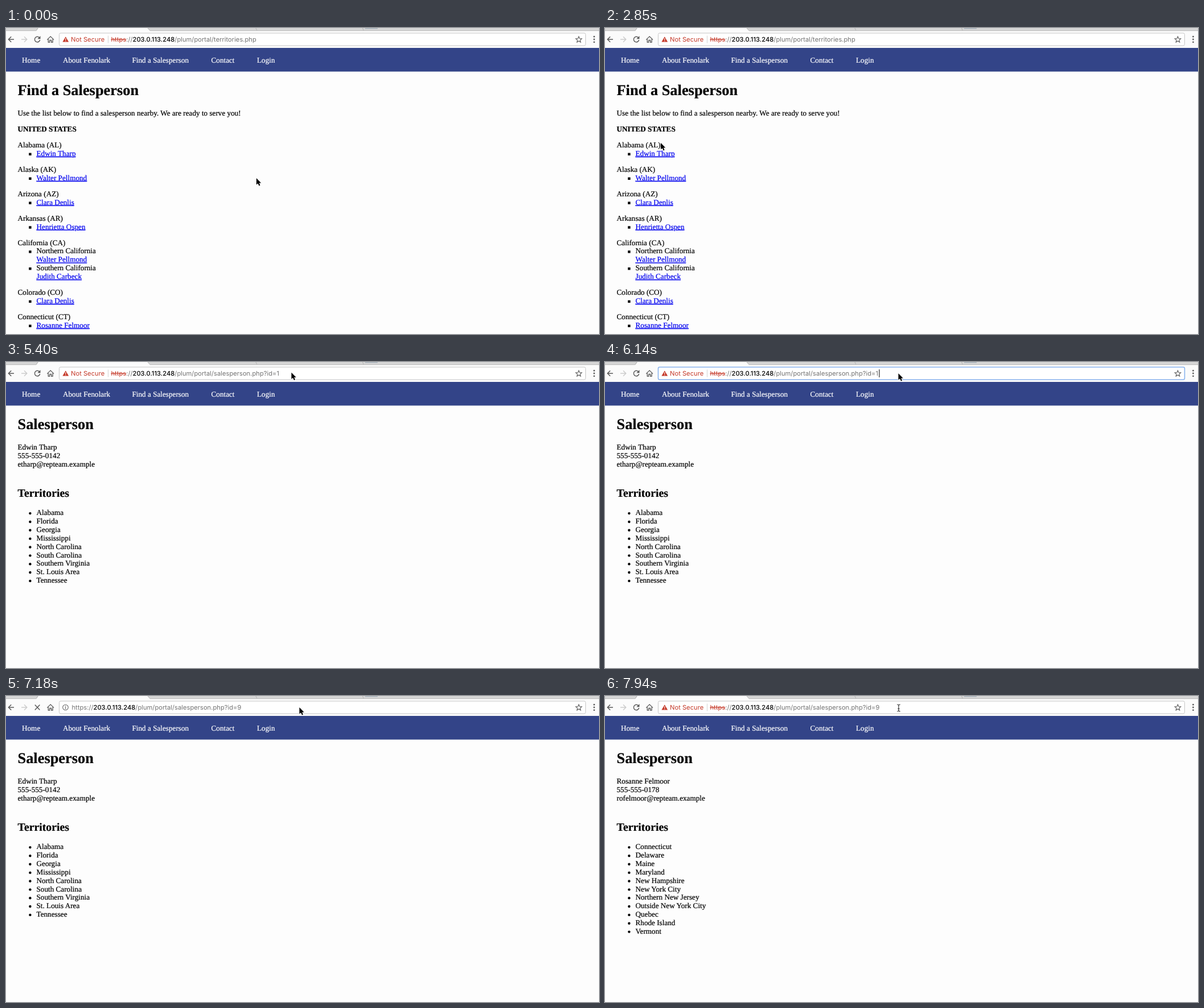
These frames come from a looping animation (1042x538 px, 8 s). An HTML page:

```html
<!DOCTYPE html>
<html lang="en">
<head>
<meta charset="utf-8">
<title>Find a Salesperson</title>
<style>
  html, body { margin: 0; width: 100%; height: 100%; overflow: hidden; background: #fdfdfd; }
  svg { display: block; width: 100%; height: 100%; }
  text {
    font: 13.2px "Liberation Serif", serif; text-rendering: geometricPrecision; white-space: pre;
    color: #000; fill: currentColor; stroke: currentColor; stroke-width: .2;
  }
  tspan { fill: currentColor; stroke: none; }
  .h1 { font-size: 26.4px; font-weight: bold; }
  .h2 { font-size: 19.8px; font-weight: bold; }
  .strong { font-weight: bold; }
  .link { color: #00e; text-decoration: underline; }
  .nav { color: #fff; }
  .ui { font: 11.2px Inter, sans-serif; stroke: none; }
  .host { font-weight: 500; }
  .match { font-size: 11.65px; font-weight: bold; }
  .blue { color: #3060d0; }
  .gray { color: #737373; }
  .red { color: #c53929; }
  .strike { text-decoration: line-through; }
  .icon { fill: none; stroke: #5a5a5a; stroke-width: 1.5; }
</style>
</head>
<body>
<svg id="stage" viewBox="0 0 1042 538" xmlns="http://www.w3.org/2000/svg"></svg>
<script>
const LOOP = 8000, LINE = 14.85;
const HOST = '203.0.113.248';
const PERSON_PATH = '/plum/portal/salesperson.php?id=';
const PERSON_URL = 'https://' + HOST + PERSON_PATH;

const text = (x, y, s, cls = '') => `<text x="${x}" y="${y}" class="${cls}">${s}</text>`;
const ui = (x, y, s, cls = '') => text(x, y, s, 'ui ' + cls);
const span = (s, cls) => `<tspan class="${cls}">${s}</tspan>`;
const rect = (x, y, w, h, fill, more = '') =>
  `<rect x="${x}" y="${y}" width="${w}" height="${h}" fill="${fill}" ${more}/>`;
const path = (d, more = 'class="icon"') => `<path d="${d}" ${more}/>`;
const at = (track, t) => track.filter(step => step[0] <= t).pop();

// Pages
const people = {
  edwin: {
    lines: ['Edwin Tharp', '555-555-0142', 'etharp@repteam.example'],
    areas: ['Alabama', 'Florida', 'Georgia', 'Mississippi', 'North Carolina', 'South Carolina',
      'Southern Virginia', 'St. Louis Area', 'Tennessee']
  },
  rosanne: {
    lines: ['Rosanne Felmoor', '555-555-0178', 'rofelmoor@repteam.example'],
    areas: ['Connecticut', 'Delaware', 'Maine', 'Maryland', 'New Hampshire', 'New York City',
      'Northern New Jersey', 'Outside New York City', 'Quebec', 'Rhode Island', 'Vermont']
  }
};
const states = [
  ['Alabama (AL)', 'Edwin Tharp'],
  ['Alaska (AK)', 'Walter Pellmond'],
  ['Arizona (AZ)', 'Clara Denlis'],
  ['Arkansas (AR)', 'Henrietta Ospen'],
  ['California (CA)', '*Northern California', 'Walter Pellmond', '*Southern California', 'Judith Carbeck'],
  ['Colorado (CO)', 'Clara Denlis'],
  ['Connecticut (CT)', 'Rosanne Felmoor']
];

function listPage() {
  let y = 210;
  let out = text(20.5, 118, 'Find a Salesperson', 'h1') +
    text(20.5, 154, 'Use the list below to find a salesperson nearby. We are ready to serve you!') +
    text(20.5, 182, 'UNITED STATES', 'strong');
  for (const [state, ...rows] of states) {
    out += text(20.5, y, state);
    for (const row of rows) {
      y += LINE;
      const region = row[0] === '*';
      if (region || rows.length === 1) out += rect(40.2, y - 5.2, 4.4, 4.4, '#000');
      out += region ? text(53.5, y, row.slice(1)) : text(53.5, y, row, 'link');
    }
    y += LINE + 13.2;
  }
  return out;
}

function personPage({ lines, areas }) {
  return text(20.5, 118, 'Salesperson', 'h1') +
    lines.map((s, i) => text(20.5, 154 + i * LINE, s)).join('') +
    text(20.5, 236.7, 'Territories', 'h2') +
    areas.map((s, i) => {
      const y = 269.3 + i * LINE;
      return `<circle cx="42.4" cy="${y - 3.2}" r="2.2"/>` + text(53.5, y, s);
    }).join('');
}

const navBar = rect(0, 35, 1042, 41.6, '#334488') +
  [[28, 'Home'], [100, 'About Fenolark'], [221.5, 'Find a Salesperson'], [360.5, 'Contact'], [441, 'Login']]
    .map(([x, s]) => text(x, 61, s, 'nav')).join('');

const pages = {
  list: navBar + listPage(),
  edwin: navBar + personPage(people.edwin),
  rosanne: navBar + personPage(people.rosanne)
};

// Browser frame
const star = 'M' + Array.from({ length: 10 }, (_, i) => {
  const r = i % 2 ? 2.5 : 5.6, a = i * Math.PI / 5;
  return (1006.5 + r * Math.sin(a)).toFixed(2) + ' ' + (20.5 - r * Math.cos(a)).toFixed(2);
}).join('L') + 'Z';
const docIcon = y => path(`M101.5 ${y - 4.5}h4l2.5 2.5v6.5h-6.5zM105.2 ${y - 4.5}v2.8h2.8`,
  'fill="none" stroke="#666"');
const searchIcon = y => path(`M106.2 ${y + 1.2}l3 3M106.8 ${y - 1}a3.2 3.2 0 1 1 -6.4 0a3.2 3.2 0 1 1 6.4 0`,
  'fill="none" stroke="#666" stroke-width="1.2"');

const chrome = rect(0, 0, 1042, 35, '#fbfbfb') +
  path('M0 0H57L54 4.5H0ZM249 0H1042V4.5H253Z', 'fill="#d6d6d6"') +
  path('M0 4.7H53L56 0M249 0L253 4.7H1042M439 0l2 4.5M626.5 0l2 4.5', 'fill="none" stroke="#b4b4b4"') +
  rect(631, 0, 22, 1.5, '#aab4bd') +
  path('M14 20H4.5M9.2 15.2L4.4 20L9.2 24.8') +
  path('M27 20H36.5M32 15.2L36.8 20L32 24.8', 'class="icon" style="stroke:#cdcdcd"') +
  path('M72.3 20.6L78.2 14.8L84.1 20.6M74.3 19.5V25H76.8V21.5H79.6V25H82.1V19.5',
    'class="icon" style="stroke-width:1.3"') +
  [15.2, 20, 24.8].map(y => `<circle cx="1033.5" cy="${y}" r="1.4" fill="#5a5a5a"/>`).join('');

const stopIcon = path('M50.8 15.6L59.4 24.4M59.4 15.6L50.8 24.4');
const reloadIcon = path('M58.5 16.8A4.7 4.7 0 1 0 59.7 21') + path('M60.5 14V19.2H55.3Z', 'fill="#5a5a5a"');

const address = (x, tail, schemeClass) => ui(x, 24.2,
  span('https', schemeClass) + span('://', 'gray') + span(HOST, 'host') + span(tail, 'gray'));

function omnibox({ security, tail, focus, selected, caret }) {
  let out = rect(93.5, 9, 925, 22, '#fff', focus
    ? 'rx="2.5" stroke="#8ab4ee" stroke-width="1.6"' : 'rx="2.5" stroke="#c6c6c6"');
  if (selected) out += rect(184, 12, 298, 15, '#b5d5fe');
  if (security === 'warning') {
    out += path('M104.8 15.2L110.2 24.6H99.4Z', 'fill="#c53929"') +
      path('M104.8 18V21.4M104.8 22.2V23.4', 'stroke="#fff" stroke-width="1.1"') +
      ui(114, 24.2, 'Not Secure', 'red') + rect(179, 13.5, 1, 13, '#d4d4d4') +
      address(184.5, tail, 'red strike');
  } else {
    out += security === 'doc' ? docIcon(20)
      : '<circle cx="104.5" cy="20" r="4.8" fill="none" stroke="#666" stroke-width="1.1"/>' +
        path('M104.5 17.2V18.4M104.5 19.3V22.8', 'stroke="#666" stroke-width="1.2"');
    out += address(115.5, tail, 'gray');
  }
  if (security !== 'doc') out += path(star, 'class="icon" style="stroke-width:1.1"');
  if (caret) out += rect(caret, 13, 1, 14, '#000');
  return out;
}

// Rows: [matched part, completion, description]
function dropdown(rows, query) {
  const pitch = 20.65, rowY = i => 49.2 + i * pitch;
  const bottom = rowY(rows.length) + 13.5;
  return rect(0, bottom, 1042, 2.5, '#dedede') + rect(0, 36, 1042, bottom - 36, '#fff') +
    rect(0, 35, 1042, 1, '#e2e2e2') + rect(0, 39, 1042, 20.3, '#e9e9e9') +
    rows.map(([match, rest, note], i) => docIcon(rowY(i)) + ui(115.5, rowY(i) + 4,
      span(match, 'match blue') + span(rest, 'blue') + span(note && ' - ' + note, 'gray'))).join('') +
    searchIcon(rowY(rows.length)) +
    ui(115.5, rowY(rows.length) + 4, query + span(' - Quindo Search', 'gray'));
}

const suggestions = dropdown([
  [PERSON_URL, '', ''],
  [PERSON_URL, '10', 'Find a Salesperson'],
  [PERSON_URL, '9', 'Salesperson: Rosanne Felmoor'],
  [PERSON_URL, '1%27 OR 1=1%27--', ''],
  [PERSON_URL, '11', '']
], PERSON_URL);
const narrowed = dropdown([[PERSON_URL + '9', '', 'Salesperson: Rosanne Felmoor']], PERSON_URL + '9');

// Pointer
const pointers = {
  arrow: path('M0 0V11.6L2.7 9.2L4.6 13.4L6.6 12.5L4.8 8.4H8.3Z',
    'stroke="#fff" stroke-width="1.6" paint-order="stroke"'),
  beam: path('M-2.8 -6Q0 -6 0 -4.5Q0 -6 2.8 -6M0 -5V5M-2.8 6Q0 6 0 4.5Q0 6 2.8 6M-1.6 1.5H1.6',
    'fill="none" stroke="#222" stroke-width="1.1"'),
  hand: path('M0 0q1.5 -1 2 1v4.2q4 0 6.5 2v3l-1.5 4h-6l-4 -5.5q0 -1.5 2.5 0z',
    'fill="#fff" stroke="#000"')
};

// Timelines
const pointerTrack = [
  [0, 440, 264, 'arrow'], [1500, 350, 250, 'arrow'], [1670, 261, 237, 'arrow'],
  [1970, 195, 225, 'arrow'], [2120, 151, 218, 'arrow'], [2410, 122, 208, 'arrow'],
  [2560, 106, 202, 'arrow'], [2700, 100, 201, 'arrow'], [2850, 98, 202, 'arrow'],
  [3000, 95, 211, 'arrow'], [3140, 92, 219, 'hand'], [3290, 91, 221, 'hand'],
  [3740, 106, 205, 'arrow'], [3890, 138, 174, 'arrow'], [4030, 177.5, 138, 'beam'],
  [4180, 280, 92, 'arrow'], [4320, 390, 52, 'arrow'], [4500, 478, 26, 'beam'],
  [4660, 520, 16, 'beam'], [4800, 513, 16, 'beam'], [4950, 507, 18, 'beam'],
  [5100, 503, 19, 'beam'], [5400, 501.5, 18.5, 'arrow'], [5540, 512, 20, 'arrow'],
  [5690, 515.5, 20, 'arrow'], [7330, 516, 21, 'beam']
];
const pageTrack = [[0, 'list'], [4180, 'edwin'], [7780, 'rosanne']];
const loadTrack = [[0, false], [3740, true], [4320, false], [7180, true], [7940, false]];
const first = PERSON_PATH + '1', ninth = PERSON_PATH + '9';
const barTrack = [
  [0, { security: 'warning', tail: '/plum/portal/territories.php' }],
  [3740, { security: 'warning', tail: first }],
  [5540, { security: 'warning', tail: first, focus: true, selected: true }],
  [6140, { security: 'warning', tail: first, focus: true, caret: 481.5 }],
  [6590, { security: 'doc', tail: PERSON_PATH, focus: true, caret: 407 }],
  [6880, { security: 'doc', tail: ninth, focus: true, caret: 414 }],
  [7180, { security: 'info', tail: ninth }],
  [7630, { security: 'warning', tail: ninth }]
];
const menuTrack = [[0, ''], [6590, suggestions], [6880, narrowed], [7180, '']];

function scene(t) {
  const [, x, y, shape] = at(pointerTrack, t);
  return rect(0, 0, 1042, 538, '#fdfdfd') + pages[at(pageTrack, t)[1]] + chrome +
    (at(loadTrack, t)[1] ? stopIcon : reloadIcon) + omnibox(at(barTrack, t)[1]) +
    at(menuTrack, t)[1] + `<g transform="translate(${x} ${y})">${pointers[shape]}</g>`;
}

const stage = document.getElementById('stage');
let shown = '';
function draw() {
  const next = scene(performance.now() % LOOP);
  if (next !== shown) stage.innerHTML = shown = next;
  requestAnimationFrame(draw);
}
draw();
</script>
</body>
</html>
```
